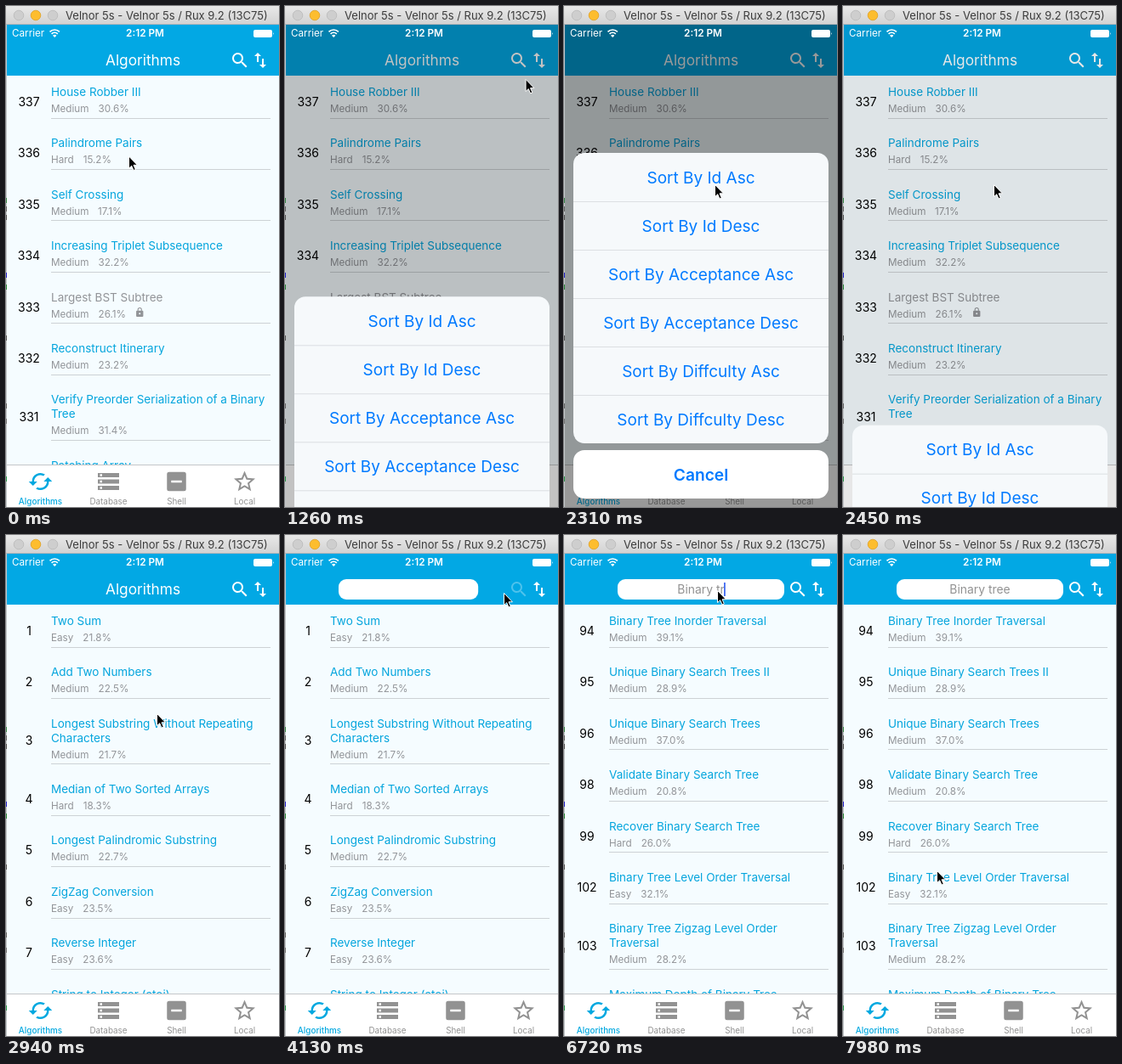
Write an HTML page that moves like this. It is 321 px wide and 590 px high and loops after 8000 ms.

```html
<!DOCTYPE html>
<html lang="en">
<head>
<meta charset="utf-8">
<title>Algorithms</title>
<style>
  html, body { margin: 0; width: 100%; height: 100%; overflow: hidden; background: #fff; }
  svg { display: block; width: 321px; height: 590px; }
  text { font: 13.5px Inter, Roboto, sans-serif; white-space: pre; }
  .mid { text-anchor: middle; }
  .name { fill: #04a5dd; }
  .locked .name, .meta { fill: #929498; }
  .meta { font-size: 11.7px; }
  .num { font-size: 14px; }
  .tab { font-size: 9.9px; fill: #929292; }
  .tab.on { fill: #02a8e0; font-weight: 500; }
  .option { font-size: 19px; fill: #007aff; }
  .cancel { font-size: 19.2px; font-weight: 600; }
</style>
</head>
<body>
<svg viewBox="0 0 321 590">
  <defs>
    <linearGradient id="chrome" x2="0" y2="1">
      <stop stop-color="#e8e8e8"/><stop offset="1" stop-color="#d2d2d2"/>
    </linearGradient>
    <clipPath id="listArea"><rect x="1" y="82" width="320" height="458"/></clipPath>
  </defs>

  <rect width="321" height="590" fill="#f5fcff"/>
  <g id="list" clip-path="url(#listArea)"></g>

  <rect x="1" y="22" width="320" height="60" fill="#02a8e4"/>
  <text id="heading" class="mid" x="161" y="69.5" fill="#fff" style="font-size:17.3px">Algorithms</text>
  <rect id="field" x="63" y="52" height="24" rx="9" fill="#fff"/>
  <text id="query" class="mid" x="161" y="69" fill="#929292" style="font-size:13.9px"></text>
  <rect id="caret" y="56" width="1.8" height="16" fill="#426bf2"/>
  <path id="search" transform="translate(263 52)" fill="#fff" d="M15.5 14h-.79l-.28-.27A6.5 6.5 0 1 0 13.73 14.43l.27.28v.79l5 5L20.5 19zM9.5 14a4.5 4.5 0 1 1 0-9 4.5 4.5 0 0 1 0 9z" fill-rule="evenodd"/>
  <path id="swap" transform="translate(287 52)" fill="#fff" d="M16 17V10h-2v7h-3l4 4 4-4zM9 3 5 7h3v7h2V7h3z"/>

  <g id="tabs">
    <rect x="1" y="540" width="320" height="50" fill="#fff"/>
    <rect x="1" y="540" width="320" height="1" fill="#c4c6c8"/>
  </g>

  <rect id="dim" x="1" y="22" width="320" height="568"/>
  <g id="sheet">
    <rect x="11" y="173" width="300" height="342" rx="13" fill="#f6f9fb"/>
    <rect x="11" y="523" width="300" height="57" rx="13" fill="#fff"/>
    <text class="mid option cancel" x="161" y="558.5">Cancel</text>
  </g>

  <g fill="#fff">
    <text x="7" y="36.3" style="font-size:11.7px">Carrier</text>
    <text class="mid" x="163.5" y="36.3" style="font-size:11.8px;font-weight:600">2:12 PM</text>
    <g fill="none" stroke="#fff" stroke-width="1.7">
      <path d="M51.5 30.4a8 8 0 0 1 11.4 0M53.6 32.8a5 5 0 0 1 7.2 0"/>
    </g>
    <path d="M57.2 37 55 34.7a3.2 3.2 0 0 1 4.4 0z"/>
    <rect x="291" y="28" width="22" height="9" rx="2"/>
    <path d="M314 31q1.6 1.5 0 3z"/>
  </g>

  <g id="edge"><rect y="22" width="1" height="568" fill="#c3c7ca"/></g>
  <rect width="321" height="22" fill="url(#chrome)"/>
  <rect y="21" width="321" height="1" fill="#b8b6b8"/>
  <g stroke-width=".8">
    <circle cx="15" cy="11" r="5.8" fill="#cecece" stroke="#b9b9b9"/>
    <circle cx="35" cy="11" r="5.8" fill="#fdbd2e" stroke="#dfa023"/>
    <circle cx="55" cy="11" r="5.8" fill="#cecece" stroke="#b9b9b9"/>
  </g>
  <text x="70" y="15.8" fill="#3c3c3c" style="font-size:13px">Velnor 5s - Velnor 5s / Rux 9.2 (13C75)</text>

  <path id="pointer" d="M0 0v14.2l3.2-3 2.3 5.3 2.3-1-2.3-5.2h4.4z" stroke="#fff" stroke-width="1" stroke-linejoin="round"/>
</svg>
<script>
const LOOP = 8000, TICK = 70;
const $ = id => document.getElementById(id);
const add = (id, markup) => $(id).insertAdjacentHTML('beforeend', markup);

// id, title (| breaks the line), difficulty, acceptance
const problems = `
1;Two Sum;Easy;21.8
2;Add Two Numbers;Medium;22.5
3;Longest Substring Without Repeating|Characters;Medium;21.7
4;Median of Two Sorted Arrays;Hard;18.3
5;Longest Palindromic Substring;Medium;22.7
6;ZigZag Conversion;Easy;23.5
7;Reverse Integer;Easy;23.6
8;String to Integer (atoi);Easy;13.6
9;Palindrome Number;Easy;30.4
17;Letter Combinations of a Phone|Number;Medium;28.1
30;Substring with Concatenation of All|Words;Hard;20.6
39;Combination Sum;Medium;30.4
40;Combination Sum II;Medium;27.2
67;Add Binary;Easy;26.9
70;Climbing Stairs;Easy;36.3
94;Binary Tree Inorder Traversal;Medium;39.1
95;Unique Binary Search Trees II;Medium;28.9
96;Unique Binary Search Trees;Medium;37.0
98;Validate Binary Search Tree;Medium;20.8
99;Recover Binary Search Tree;Hard;26.0
102;Binary Tree Level Order Traversal;Easy;32.1
103;Binary Tree Zigzag Level Order|Traversal;Medium;28.2
104;Maximum Depth of Binary Tree;Easy;47.5
330;Patching Array;Medium;30.2
331;Verify Preorder Serialization of a Binary|Tree;Medium;31.4
332;Reconstruct Itinerary;Medium;23.2
333;Largest BST Subtree;Medium;26.1
334;Increasing Triplet Subsequence;Medium;32.2
335;Self Crossing;Medium;17.1
336;Palindrome Pairs;Hard;15.2
337;House Robber III;Medium;30.6`.trim().split('\n').map(line => {
  const [id, title, level, rate] = line.split(';');
  return { id, title, level, rate, locked: id === '333' };
});

const LOCK = 'M18 8h-1V6A5 5 0 0 0 7 6v2H6a2 2 0 0 0-2 2v10a2 2 0 0 0 2 2h12a2 2 0 0 0 2-2V10a2 2 0 0 0-2-2zM12 17a2 2 0 1 1 0-4 2 2 0 0 1 0 4zM9 8V6a3 3 0 0 1 6 0v2z';

const tabs = [
  ['Algorithms', 'M19 8l-4 4h3a6 6 0 0 1-8.8 5.3l-1.46 1.46A8 8 0 0 0 20 12h3zM6 12a6 6 0 0 1 8.8-5.3l1.46-1.46A8 8 0 0 0 4 12H1l4 4 4-4z'],
  ['Database', 'M2 20h20v-4H2zM4 17h2v2H4zM2 4v4h20V4zM6 7H4V5h2zM2 14h20v-4H2zM4 11h2v2H4z'],
  ['Shell', 'M19 3H5a2 2 0 0 0-2 2v14a2 2 0 0 0 2 2h14a2 2 0 0 0 2-2V5a2 2 0 0 0-2-2zM17 13H7v-2h10z'],
  ['Local', 'M22 9.24l-7.19-.62L12 2 9.19 8.63 2 9.24l5.46 4.73L5.82 21 12 17.27 18.18 21l-1.63-7.03zM12 15.4l-3.76 2.27 1-4.28-3.32-2.88 4.38-.38L12 6.1l1.71 4.04 4.38.38-3.32 2.88 1 4.28z']
];
tabs.forEach(([label, path], i) => {
  const x = 40.5 + 80 * i;
  add('tabs', `<g class="tab ${i ? '' : 'on'}"><path fill-rule="evenodd" transform="translate(${x - 15} 545) scale(1.25)" d="${path}"/>
    <text class="mid tab ${i ? '' : 'on'}" x="${x}" y="586.8">${label}</text></g>`);
});

['Id', 'Acceptance', 'Diffculty'].flatMap(k => [k + ' Asc', k + ' Desc']).forEach((label, i) => {
  const y = 173 + 57 * i;
  if (i) add('sheet', `<rect x="11" y="${y}" width="300" height="1" fill="#dcdfe2"/>`);
  add('sheet', `<text class="mid option" x="161" y="${y + 35.5}">Sort By ${label}</text>`);
});

[[226, '#3a8a4a'], [236, '#666'], [246, '#555'], [314, '#2222cc'], [328, '#2a8a3a'], [388, '#555'], [468, '#666'], [486, '#777'], [554, '#2a9a4a']]
  .forEach(([y, fill]) => add('edge', `<rect y="${y}" width="1" height="6" fill="${fill}"/>`));

function row(p, y) {
  const lines = p.title.split('|'), extra = 16.7 * (lines.length - 1);
  const names = lines.map((s, i) => `<text class="name" x="53" y="${y + 23.7 + 17 * i}">${s}</text>`).join('');
  const lock = p.locked ? `<path class="meta" fill-rule="evenodd" transform="translate(151 ${y + 30.7}) scale(.52)" d="${LOCK}"/>` : '';
  return `<g class="${p.locked ? 'locked' : ''}">
    <text class="mid num" x="27" y="${y + 36 + extra / 2}">${p.id}</text>${names}
    <text class="meta" x="53" y="${y + 43 + extra}">${p.level}<tspan dx="11">${p.rate}%</tspan></text>${lock}
    <rect x="53" y="${Math.round(y + 49.6 + extra)}" width="258" height="1" fill="#cdd2d5"/></g>`;
}

const matches = (title, query) => {
  let at = 0;
  for (const c of title.toLowerCase()) if (c === query[at]) at++;
  return at >= query.length;
};

let shown;
function showList(ascending, query) {
  const key = ascending + query;
  if (key === shown) return;
  shown = key;
  const found = problems.filter(p => matches(p.title, query.toLowerCase()));
  if (!ascending) found.reverse();
  let y = 82, html = '';
  for (const p of found) {
    if (y > 540) break;
    html += row(p, y);
    y += p.title.includes('|') ? 77.1 : 60.45;
  }
  $('list').innerHTML = html;
}

const PHRASE = 'Binary tree';
const keyTimes = [5110, 5250, 5460, 5740, 5880, 6020, 6230, 6510, 6650, 6930, 7070];
// time, letters of the phrase the list is filtered by
const filters = [[5320, 1], [5530, 3], [5880, 4], [6090, 5], [6230, 6], [6720, 8]];

// time, x, y of the pointer tip
const route = [
  [0, 144.5, 177], [300, 144.5, 177], [1120, 303, 62], [1160, 303, 62], [1540, 179.5, 213],
  [1960, 179.5, 213], [2310, 177.5, 210.5], [3220, 177.5, 210.5], [3570, 278, 76], [3720, 278, 76],
  [4130, 257.5, 68.5], [4550, 180.5, 65.5], [7420, 180.5, 65.5], [7840, 112, 430],
  [7910, 112, 430], [7980, 110.5, 395.5], [8000, 110.5, 395.5]
];
const clamp = v => Math.max(0, Math.min(1, v));
const ease = p => .5 - .5 * Math.cos(Math.PI * clamp(p));
const settle = ms => { const k = Math.max(0, ms) * .02; return 1 - (1 + k) * Math.exp(-k); };

function pointerAt(t) {
  const i = route.findIndex(([time]) => time > t);
  const [t0, x0, y0] = route[i - 1], [t1, x1, y1] = route[i];
  const p = ease((t - t0) / (t1 - t0));
  return [x0 + (x1 - x0) * p, y0 + (y1 - y0) * p];
}

function draw(t) {
  $('pointer').setAttribute('transform', `translate(${pointerAt(t)})`);

  const open = t < 2730 ? settle(t - 1160) - settle(t - 2310) : 0;
  $('dim').setAttribute('opacity', .4 * open);
  $('sheet').setAttribute('transform', `translate(0 ${417 * (1 - open)})`);
  $('swap').setAttribute('opacity', t >= 1120 && t < 1260 ? .3 : 1);
  $('search').setAttribute('opacity', t >= 3780 && t < 4200 ? .3 : .3 + .7 * (t < 3780 ? 1 : clamp((t - 4130) / 210)));

  $('heading').style.display = t < 3780 ? '' : 'none';
  $('field').setAttribute('width', 196 * ease((t - 3762) / 500));

  const query = PHRASE.slice(0, keyTimes.filter(k => k <= t).length);
  if ($('query').textContent !== query) $('query').textContent = query;
  const half = query ? $('query').getComputedTextLength() / 2 : 0;
  $('caret').setAttribute('x', 160.3 + half);
  $('caret').style.display = t >= 4690 && t < 7490 ? '' : 'none';

  const applied = filters.filter(([time]) => time <= t).pop();
  showList(t >= 2940, applied ? PHRASE.slice(0, applied[1]) : '');
}

const start = performance.now();
function frame() {
  const t = (performance.now() - start) % LOOP;
  draw(Math.floor(t / TICK) * TICK);
  requestAnimationFrame(frame);
}
frame();
</script>
</body>
</html>
```
